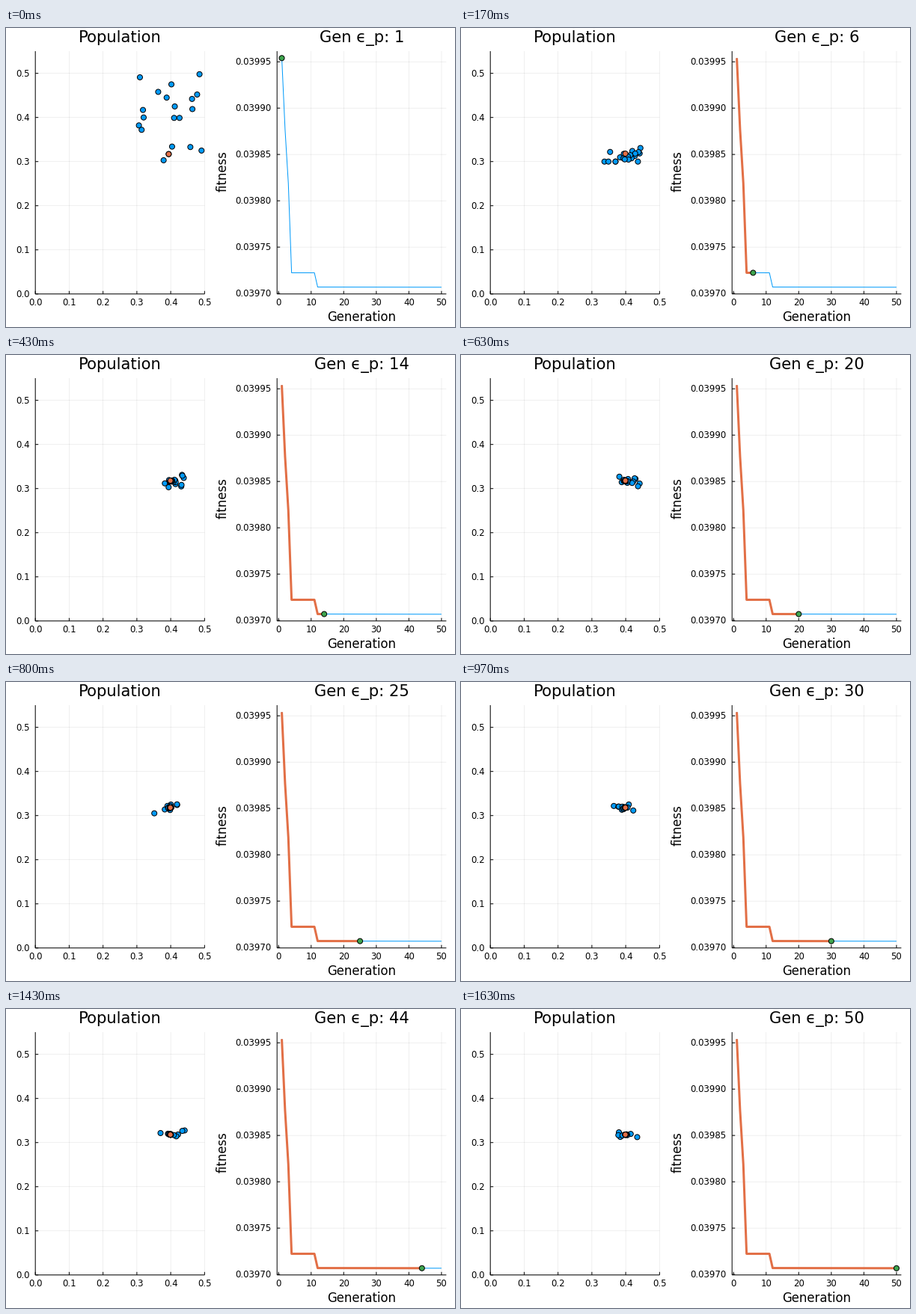
A matplotlib script that plays this animation: 600x400 px, repeating every 1660 ms.

```python
import numpy as np
import matplotlib.pyplot as plt
from matplotlib.animation import FuncAnimation
from matplotlib.patches import Circle

W, H, DPI = 600, 400, 100
PX = 72 / DPI                      # points per pixel
TICK, LABEL, TITLE = 11.8, 16.5, 21.2
BLUE, ORANGE, GREEN = "#009AFA", "#E26F46", "#3EA44E"
GENS, STEPS, STEP_MS = 50, 166, 10
LEFT, RIGHT, TOP, BOTTOM = (39.2, 265.4), (362.2, 588.4), 31, 355.8
DOT = 3.5                          # marker radius

plt.rcParams["font.family"] = "DejaVu Sans"
fig = plt.figure(figsize=(W / DPI, H / DPI), dpi=DPI, facecolor="white")
ax = fig.add_axes([0, 0, 1, 1])
ax.set(xlim=(0, W), ylim=(H, 0))
ax.axis("off")


def pop_x(v):
    return LEFT[0] + 452.3 * v


def pop_y(v):
    return BOTTOM - 590.3 * v


def gen_x(g):
    return 364.2 + 4.355 * g


def fit_y(f):
    return 355.1 - (f - 0.0397) * 1.2396e6


def line(xs, ys, color="black", width=1.0, **kw):
    return ax.plot(xs, ys, color=color, lw=width * PX, snap=False,
                   solid_capstyle="butt", **kw)[0]


def text(x, y, s, size, ha="center", **kw):
    return ax.text(x, y, s, fontsize=size * PX, ha=ha, va="baseline", **kw)


def panel(span, xticks, yticks):
    x0, x1 = span
    for x, s in xticks:
        line([x, x], [TOP, BOTTOM], width=0.6, alpha=0.1)
        line([x, x], [BOTTOM, BOTTOM - 4])
        text(x, 371.4, s, TICK)
    for y, s in yticks:
        line([x0, x1], [y, y], width=0.6, alpha=0.1)
        line([x0, x0 + 4], [y, y])
        text(x0 - 7.7, y + 4.3, s, TICK, ha="right")
    line([x0, x0], [TOP, BOTTOM])
    line([x0, x1], [BOTTOM, BOTTOM])


tenths = np.arange(6) / 10
panel(LEFT, [(pop_x(v), f"{v:.1f}") for v in tenths],
      [(pop_y(v), f"{v:.1f}") for v in tenths])
panel(RIGHT, [(gen_x(g), str(g)) for g in range(0, 51, 10)],
      [(fit_y(f), f"{f:.5f}") for f in 0.0397 + 5e-5 * np.arange(6)])
text(152.3, 18.7, "Population", TITLE)
title = text(475.3, 18.7, "", TITLE)
text(475.3, 392, "Generation", LABEL)
text(294.7, 192, "fitness", LABEL, rotation=90, rotation_mode="anchor")

# Best fitness per generation: steep drop, then two plateaus
gens = np.arange(1, GENS + 1)
fitness = 0.0397 + 1e-7 * np.interp(gens, [1, 2, 3, 4, 11, 12, 50],
                                    [2540, 1770, 1190, 223, 223, 69, 67])
curve_x, curve_y = gen_x(gens), fit_y(fitness)

# First swarm, in thousandths; later ones follow from the orbit rule below
START = np.array([
    (309, 491), (491, 325), (485, 498), (306, 382), (478, 452),
    (314, 372), (464, 419), (318, 417), (463, 442), (458, 333),
    (320, 400), (402, 475), (363, 458), (426, 399), (412, 425),
    (388, 445), (410, 399), (379, 303), (404, 334), (394, 317)], float)
SIZE = len(START)
rng = np.random.default_rng(7)
phase = rng.uniform(0, 2 * np.pi, (SIZE, 2))
speed = rng.uniform(0.5, 1.6, (SIZE, 2))
rank = np.linspace(1, 0.05, SIZE)[:, None]


def swarm(g):
    """Damped orbits about the best point, pulled in from the first swarm."""
    fade = np.exp(-(g - 1) / 1.2)
    centre = np.array([399, 318 - 12 * np.exp(-abs(g - 6) / 4)])
    size = np.array([45 + 45 * np.exp(-g / 10), 10 + 22 * np.exp(-g / 12)])
    reach = rank ** (0.5 + g / 12)
    orbit = centre + size * reach * np.sin(phase + speed * g)
    p = np.clip(fade * START + (1 - fade) * orbit, 300, 500)
    best = START[-1] + (1 - fade) * (np.array([399, 318]) - START[-1])
    p = np.vstack([p, best]) / 1000
    return np.column_stack([pop_x(p[:, 0]), pop_y(p[:, 1])])


line(curve_x, curve_y, BLUE)
trail = line([], [], ORANGE, 3)
head = ax.add_patch(Circle((0, 0), DOT, fc=GREEN, ec="black", lw=PX, zorder=4))
dots = ax.scatter(*swarm(1).T, s=(2 * DOT * PX) ** 2,
                  c=[BLUE] * SIZE + [ORANGE],
                  edgecolors="black", linewidths=PX, zorder=3)


def update(n):
    g = int((n + 0.5) * 0.3) + 1   # 30 generations per second
    title.set_text(f"Gen ϵ_p: {g}")
    trail.set_data(curve_x[:g], curve_y[:g])
    head.center = curve_x[g - 1], curve_y[g - 1]
    dots.set_offsets(swarm(g))
    return title, trail, head, dots


anim = FuncAnimation(fig, update, frames=STEPS, interval=STEP_MS,
                     init_func=lambda: update(0), repeat=True, repeat_delay=0)
plt.show()
```
